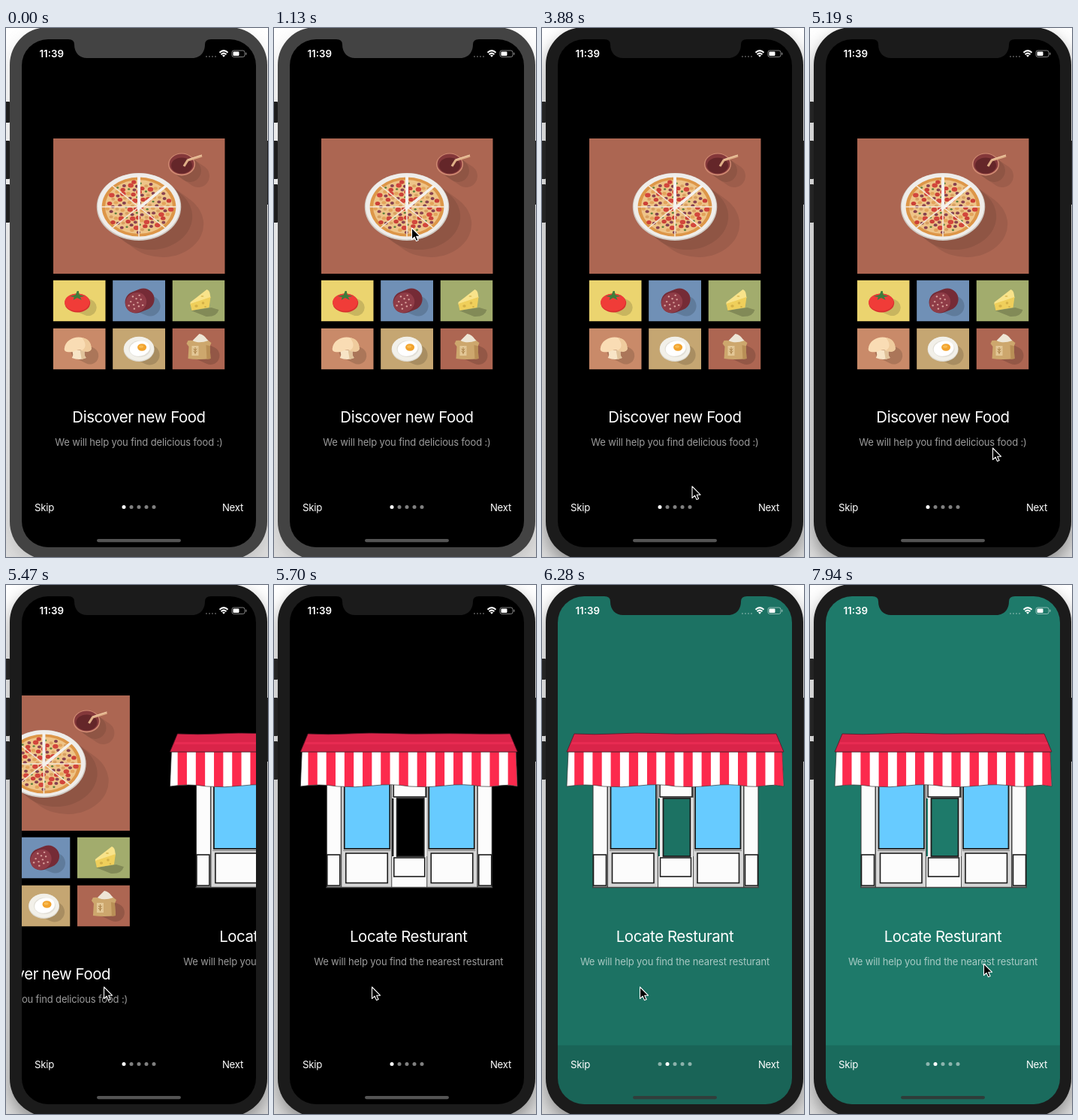
Write an HTML page that moves like this. It is 349x704 px and loops after 8 s.

```html
<!DOCTYPE html>
<html lang="en">
<head>
<meta charset="utf-8">
<title>Food onboarding</title>
<style>
html, body { margin: 0; width: 100%; height: 100%; overflow: hidden; background: #fafafa; }
svg { display: block; width: 349px; height: 704px; font-family: Inter, Roboto, sans-serif; }
text { fill: #fff; }
.mid { text-anchor: middle; }
.title { font-size: 20.4px; letter-spacing: -.42px; }
.sub { font-size: 13px; letter-spacing: -.15px; opacity: .61; }
.nav { font-size: 13.2px; letter-spacing: -.25px; }
.clock { font-size: 13.3px; font-weight: 600; }
.shade { stroke: #000; stroke-opacity: .15; stroke-linecap: round; fill: none; }
.soft { stroke-opacity: .09; }
.box { fill: #fcfcfc; stroke: #1c1c1c; stroke-width: 1.6; }
</style>
</head>
<body>
<svg viewBox="0 0 349 704">
  <defs>
    <linearGradient id="wall" x2="0" y2="1">
      <stop stop-color="#fff"/><stop offset="1" stop-color="#dedede"/>
    </linearGradient>
    <clipPath id="screen"><rect x="21" y="15" width="312" height="676" rx="35"/></clipPath>
    <clipPath id="hero"><rect x="63" y="147" width="228.5" height="180"/></clipPath>
    <clipPath id="tile"><rect x="-35" y="-27.5" width="70" height="55"/></clipPath>
    <clipPath id="awning"><path id="valance" d="M35 222H320L322 268Q310 265 298 267T274 268Q250 264 226 267T178 268Q154 264 130 267T82 268Q58 264 33 268Z"/></clipPath>
  </defs>

  <rect width="349" height="704" fill="url(#wall)"/>
  <g id="buttons">
    <rect x="-2" y="98" width="7" height="28" rx="1"/>
    <rect x="-2" y="150" width="7" height="51" rx="1"/>
    <rect x="-2" y="208" width="7" height="51" rx="1"/>
    <rect x="346" y="150" width="5" height="85" rx="1"/>
  </g>
  <rect id="body" x="5" y="-1" width="343" height="708" rx="50"/>

  <g clip-path="url(#screen)">
    <rect id="back" x="21" y="15" width="312" height="676"/>
    <g id="pages">
      <g id="food">
        <g clip-path="url(#hero)">
          <rect x="63" y="147" width="229" height="180" fill="#ac6652"/>
          <g transform="translate(177 238) scale(1.25 1)">
            <path class="shade soft" stroke-width="88" d="M0 0L25 23"/>
            <path class="shade soft" stroke-width="88" d="M0 0L13 13"/>
            <circle r="45" fill="#cfc9c2"/>
            <circle r="44" cy="-.8" fill="#efedea"/>
            <circle r="39.5" fill="#dd9648"/>
            <circle r="36" fill="#eec488"/>
            <g id="toppings"></g>
            <g id="cuts" stroke="#f4e6d4" stroke-width="1.3"></g>
            <path d="M0 -41V2L30 -29" fill="none" stroke="#f4f1ed" stroke-width="3.2"/>
          </g>
          <path class="shade soft" stroke-width="30" d="M234 182L256 197"/>
          <path class="shade soft" stroke-width="30" d="M234 182L245 190"/>
          <ellipse cx="234" cy="181.5" rx="18" ry="15" fill="#d08a72"/>
          <ellipse cx="234" cy="181" rx="16.5" ry="13.5" fill="#84383a"/>
          <ellipse cx="234" cy="183" rx="14" ry="10.5" fill="#642629"/>
          <path d="M237 184L242 176 261 170" fill="none" stroke="#dfaf87" stroke-width="3.2"/>
          <path d="M242 175L261 169" fill="none" stroke="#f0cba6"/>
        </g>
        <g id="tiles"></g>
        <text class="mid title" x="177" y="525">Discover new Food</text>
        <text class="mid sub" x="177" y="556">We will help you find delicious food :)</text>
      </g>

      <g id="store" transform="translate(312)">
        <path d="M68 262H155V403H68ZM200 262H288V403H200ZM155 262H200V284H155ZM155 361H200V403H155Z" fill="#fcfcfc"/>
        <g id="half">
          <path d="M68 262V402H87V262" fill="none" stroke="#333"/>
          <rect class="box" x="68.5" y="359" width="17" height="41"/>
          <rect x="87.5" y="262" width="67" height="140.5" fill="#d6d6d6" stroke="#444"/>
          <rect x="91.5" y="262" width="60.5" height="89" fill="#67cbff" stroke="#1c1c1c" stroke-width="1.8"/>
          <path d="M90 353.5H153" stroke="#777"/>
          <rect class="box" x="93.5" y="357" width="55.5" height="39.5"/>
        </g>
        <use href="#half" transform="matrix(-1 0 0 1 356 0)"/>
        <rect class="box" x="157" y="263" width="43" height="19"/>
        <path d="M159 283V361M199.5 283V361" stroke="#eee" stroke-width="4"/>
        <rect x="161.5" y="284" width="36" height="77" fill="none" stroke="#1c1c1c" stroke-width="1.8"/>
        <rect class="box" x="157.5" y="363" width="41" height="25"/>
        <path d="M67 402.5H289" stroke="#444" stroke-width="1.6"/>
        <g clip-path="url(#awning)">
          <rect x="33" y="220" width="290" height="52" fill="#fff"/>
          <g id="stripes" fill="#fc2a4d"></g>
        </g>
        <use href="#valance" fill="none" stroke="#333" stroke-width=".7"/>
        <path d="M43 198Q70 199.5 97 198T151 197.5T205 198T259 198T312 198L322 222H33Z" fill="#da2449" stroke="#551525" stroke-width=".8"/>
        <path d="M40 209H316L317 212H39Z" fill="#e82b52"/>
        <text class="mid title" x="177" y="475">Locate Resturant</text>
        <text class="mid sub" x="177" y="506">We will help you find the nearest resturant</text>
      </g>
    </g>

    <rect x="21" y="612.5" width="312" height="79" fill-opacity=".12"/>
    <text class="nav" x="38" y="642.5">Skip</text>
    <text class="nav" x="316" y="642.5" text-anchor="end">Next</text>
    <g id="dots" fill="#fff"></g>
    <rect id="home" x="121" y="680" width="112" height="4.2" rx="2.1"/>
  </g>

  <path id="notch" d="M83 14V15Q91 15 91 22C91 33 98 40 108 40H248C258 40 265 33 265 22Q265 15 273 15V14Z"/>
  <text class="clock" x="44.5" y="39">11:39</text>
  <path d="M267 38H281" stroke="#fff" stroke-opacity=".35" stroke-width="2" stroke-linecap="round" stroke-dasharray="0 4"/>
  <g fill="none" stroke="#fff" stroke-width="2">
    <path d="M284.5 32.8Q290 27.5 295.5 32.8M286.6 35.3Q290 32 293.4 35.3"/>
    <path d="M288 36.5L290 38.8 292 36.5Q290 35 288 36.5Z" fill="#fff" stroke="none"/>
  </g>
  <rect x="301" y="30" width="17" height="8.5" rx="2.4" fill="none" stroke="#fff" stroke-opacity=".5"/>
  <rect x="302.5" y="31.4" width="8" height="5.7" rx="1" fill="#fff"/>
  <path d="M319.8 32.8V35.8" stroke="#fff" stroke-opacity=".5" stroke-width="1.3"/>

  <path id="cursor" d="M0 0V15.5L3.6 12.2 6 17.6 8.6 16.5 6.2 11.2H11Z" stroke="#fff" stroke-width="1.1" stroke-linejoin="round"/>
</svg>

<script>
const $ = id => document.getElementById(id);
const fill = (id, html) => { $(id).innerHTML = html; };
const times = (n, make) => Array.from({ length: n }, (_, i) => make(i)).join('');

// Toppings follow a sunflower spiral.
const kinds = [['#d2463c', 3], ['#84404f', 2], ['#e3a45c', 2.2], ['#cb4038', 2.6], ['#5d7f3c', 1.3], ['#d9a062', 2], ['#8c4450', 2]];
fill('toppings', times(112, i => {
  const r = 34.5 * Math.sqrt((i + .5) / 112), a = i * 2.39996;
  const [color, size] = kinds[(i * 3 + (i >> 3)) % kinds.length];
  return `<circle cx="${r * Math.cos(a)}" cy="${r * Math.sin(a)}" r="${size}" fill="${color}"/>`;
}));
fill('cuts', times(4, i => `<path d="M-40 0H40" transform="rotate(${i * 45})"/>`));
fill('stripes', times(12, i => `<rect x="${43.2 + i * 24.2}" y="220" width="12.3" height="52"/>`));
fill('dots', times(5, i => `<circle cx="${157 + i * 10}" cy="637.5" r="2.5"/>`));

const shade = (w, d) => `<path class="shade" stroke-width="${w}" d="${d}"/>`;
const oval = (x, y, rx, ry, color, turn = 0) =>
  `<ellipse rx="${rx}" ry="${ry}" fill="${color}" transform="translate(${x} ${y}) rotate(${turn})"/>`;
const shape = (d, color) => `<path d="${d}" fill="${color}"/>`;

const tomato = shade(22, 'M0 4L12 9') + oval(-2.5, 3, 17, 12.5, '#d8302f') + oval(-3, 2, 16.5, 11.5, '#f03c38') +
  shape('M-13 -6L-5 -8 -3 -13 -1 -13 0 -8 7 -6 1 -5 3 -1 -3 -4 -8 -1 -7 -5Z', '#3f7d3c');

const salami = shade(27, 'M0 1L15 7') +
  '<path d="M-4 2L6 -2" stroke="#752b36" stroke-width="29" stroke-linecap="round"/>' +
  oval(-4, 2.5, 14.5, 13, '#8f3c47', -35) +
  times(11, i => {
    const r = 11 * Math.sqrt((i + .5) / 11), a = i * 2.4;
    return oval(-4 + r * Math.cos(a), 2.5 + r * Math.sin(a), 1.3, 1.1, '#dba59f');
  });

const cheese = shape('M-10 13L17 9 27 12Q24 22 10 21Z', 'rgba(0,0,0,.2)') +
  shape('M-11 2L11 -15Q14 -14 15 -10L16 -4 -11 5Z', '#f8e38a') +
  shape('M-11 4L16 -5 14 9 -9 13Z', '#efcf5b') +
  oval(-3, 7, 2.2, 1.7, '#d3b047') + oval(6, 3, 1.8, 1.8, '#d3b047') + oval(9, 8, 1.3, 1, '#d3b047') + oval(5, -6, 2, 1, '#dfc05c');

const mushroom = shade(23, 'M0 2L14 9') +
  shape('M-10 2H7Q6 9 9 12 0 16 -10 12 -7 8 -10 2Z', '#f7e4c6') + shape('M1 2H7Q6 9 9 12L3 14Z', '#e0c29a') +
  shape('M-20 0C-18 -20 16 -21 16 0 15 5 7 4 3 2 -1 1 -5 2 -9 4 -16 5 -20 4 -20 0Z', '#f9dcb4') +
  shape('M3 -15C13 -14 16 -7 16 0 15 5 7 4 3 2 10 -1 9 -9 3 -15Z', '#efcb9d');

const egg = shade(27, 'M0 1L14 8') + oval(0, .5, 20.5, 16.5, '#dcd9d0') + oval(0, -.3, 20, 16, '#f2f0e9') +
  oval(1, 0, 14.5, 11, '#e2dfd7') + oval(1, -.5, 13.5, 10, '#fff', -12) + oval(4, -2, 6, 4.8, '#f2a32d') + oval(3, -3, 3, 1.8, '#f8bc53');

const flour = shade(24, 'M3 3L16 9') +
  shape('M-10 -9Q-5 -14 1 -20 7 -19 11 -13 15 -10 15 -5H-12Z', '#eee6d6') +
  shape('M-14 -11Q-8 -12 -6 -10 2 -7 13 -11L17 -8 15 -3 16 13Q0 15 -14 13L-13 -3 -16 -7Z', '#cda76d') +
  shape('M10 -5L15 -4 16 13 11 14Z', '#b98f56') +
  shape('M-9 -4H0V9H-9Z', '#e3c796') + '<path d="M-4.5 7V-2M-7 0L-4.5 2 -2 0M-7 3L-4.5 5 -2 3" fill="none" stroke="#a67c42"/>';

const foods = [['#ebd46f', tomato], ['#7090b6', salami], ['#a2ac6d', cheese], ['#c98a69', mushroom], ['#c5a672', egg], ['#ad6652', flour]];
fill('tiles', foods.map(([color, art], i) =>
  `<g transform="translate(${97.7 + i % 3 * 79.4} ${363 + (i > 2) * 64})" clip-path="url(#tile)">
    <rect x="-35" y="-27.5" width="70" height="55" fill="${color}"/>${art}</g>`).join(''));

// Pointer stops: time, x, y.
const release = 5449, width = 312, slop = 10;
const stops = [
  [830, 281, 442], [1040, 186, 259], [1130, 183.5, 266], [2880, 183.5, 266],
  [3160, 222, 335], [3440, 208, 440], [3650, 176, 462], [3710, 172, 470],
  [3880, 200, 610], [4110, 200, 610], [4320, 260, 645], [4450, 264, 600], [4590, 243.5, 561],
  [5190, 243.5, 559], [release, 130.5, 535], [6800, 130.5, 535],
  [7050, 150, 500], [7350, 170, 525], [7600, 122, 515],
  [7700, 92, 512], [7940, 231.5, 504]
];
const clamp = v => Math.min(1, Math.max(0, v));
const smooth = p => p * p * (3 - 2 * p);
const mix = (a, b, p) => a + (b - a) * p;

function pointer(t) {
  const i = stops.findIndex(s => s[0] > t);
  if (i < 0) return stops[stops.length - 1].slice(1);
  const a = stops[Math.max(0, i - 1)], b = stops[i];
  const p = smooth(clamp((t - a[0]) / (b[0] - a[0])));
  return [mix(a[1], b[1], p), mix(a[2], b[2], p)];
}

// Follow the drag, then spring to the next page.
function scroll(t) {
  if (t < 5190) return 0;
  if (t < release) return -Math.max(0, 243.5 - pointer(t)[0] - slop);
  const k = (t - release) * .026;
  return -width + (width - 103) * (1 + k) * Math.exp(-k);
}

const blend = (a, b, p) => `rgb(${a.map((v, i) => Math.round(mix(v, b[i], p)))})`;

function draw(now) {
  const t = now % 8000, focused = t >= 2000;
  const metal = focused ? '#1b1b1b' : '#434343';
  $('body').setAttribute('fill', metal);
  $('notch').setAttribute('fill', metal);
  $('buttons').setAttribute('fill', focused ? '#2b2b2b' : '#1f1f1f');
  $('body').style.filter = `drop-shadow(0 10px 11px rgba(0,0,0,${focused ? .36 : .12}))`;

  $('pages').setAttribute('transform', `translate(${scroll(t)})`);
  const fade = smooth(clamp((t - 6020) / 310));
  $('back').setAttribute('fill', blend([0, 0, 0], [30, 122, 106], fade));
  $('home').setAttribute('fill', blend([84, 84, 84], [46, 60, 57], fade));
  const page = t < 6050 ? 0 : 1;
  [...$('dots').children].forEach((dot, i) => dot.setAttribute('opacity', i === page ? 1 : .5));

  const [x, y] = pointer(t);
  $('cursor').setAttribute('transform', `translate(${x} ${y})`);
  $('cursor').setAttribute('visibility', t < 830 ? 'hidden' : 'visible');
}

const start = performance.now();
function tick() {
  draw(performance.now() - start);
  requestAnimationFrame(tick);
}
tick();
</script>
</body>
</html>
```
